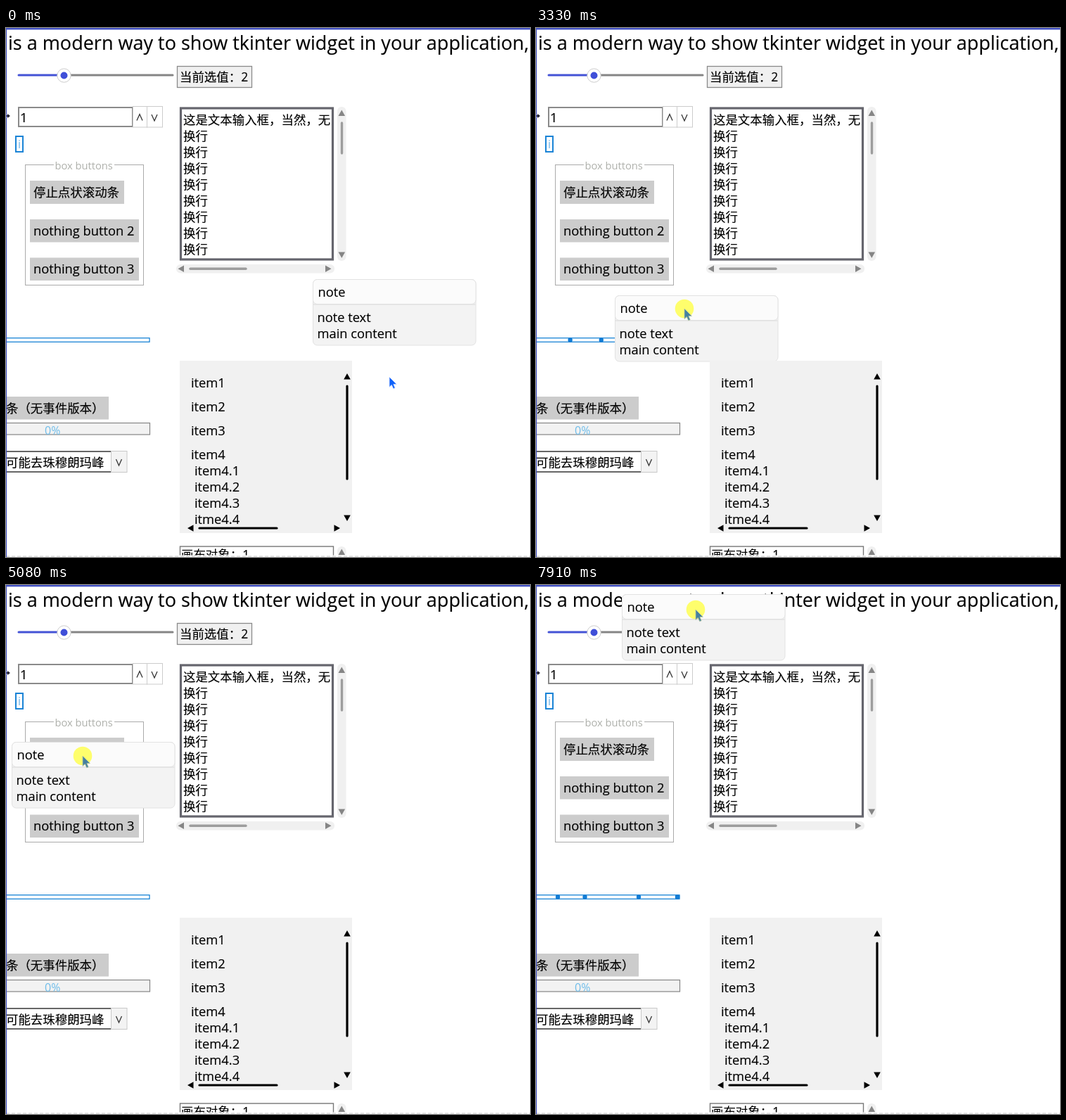
An HTML page for the animation above (7990 ms loop, 745x752 px).

```html
<!DOCTYPE html>
<html lang="zh-CN">
<head>
<meta charset="utf-8">
<style>
  html, body { margin: 0; width: 100%; height: 100%; overflow: hidden; background: #fff; }
  svg { display: block; width: 745px; height: 752px; }
  text { font: 18.3px "Open Sans", "Noto Sans CJK SC", "Noto Sans CJK", sans-serif; fill: #000; stroke: #000; stroke-width: .15px; white-space: pre; }
  .cjk { font-size: 17.45px; }
  .tint { stroke: none; }
  .round { stroke-linecap: round; }
</style>
</head>
<body>
<svg viewBox="0 0 745 752">
  <g id="base"></g>
  <g id="dots" fill="#0f7bd4"></g>
  <g id="panel"></g>
  <g id="top"></g>
  <g id="cursor">
    <circle id="halo" r="13.3" fill="#ffff3c" opacity=".75"/>
    <path id="arrow" d="M0 0V14.5L3.3 11.4 5.7 16.8 8.2 15.7 5.9 10.4H10.4Z" stroke-width=".8"/>
  </g>
</svg>
<script>
const NS = 'http://www.w3.org/2000/svg';
const $ = id => document.getElementById(id);
let layer = $('base');

function add(tag, attrs, content) {
  const el = document.createElementNS(NS, tag);
  for (const k in attrs) el.setAttribute(k, attrs[k]);
  if (content) el.textContent = content;
  return layer.appendChild(el);
}
const rect = (x, y, width, height, fill, more) => add('rect', { x, y, width, height, fill, ...more });
const frame = (x, y, w, h, stroke, sw = 1, fill = 'none') =>
  rect(x, y, w, h, fill, { stroke, 'stroke-width': sw });
const text = (x, y, s, more) => add('text', { x, y, ...more }, s);
const cjk = (x, y, s) => text(x, y, s, { class: 'cjk' });
const tinted = (x, y, s, size, fill) =>
  text(x, y, s, { class: 'tint', style: `font-size:${size}px;fill:${fill}` });
const line = (x1, y1, x2, y2, stroke, sw, more) =>
  add('line', { x1, y1, x2, y2, stroke, 'stroke-width': sw, ...more });
const bar = (x1, y1, x2, y2, color, sw) => line(x1, y1, x2, y2, color, sw, { class: 'round' });
const tri = (x, y, turn, fill) =>
  add('path', { d: 'M0-4.5L4.8 4H-4.8Z', fill, transform: `translate(${x} ${y}) rotate(${turn})` });
const caret = (x, y, dir) =>
  add('path', { d: `M${x - 4} ${y + 4.5 * dir}L${x} ${y - 4.5 * dir}L${x + 4} ${y + 4.5 * dir}`,
    fill: 'none', stroke: '#333', 'stroke-width': 1.3 });

function drawBase() {
  text(3, 30.7, 'is a modern way to show tkinter widget in your application,', { style: 'font-size:27px' });

  // slider and its value
  bar(18, 67, 76, 67, '#4453d6', 3);
  bar(88, 67, 237, 67, '#858585', 3);
  add('circle', { cx: 82.5, cy: 67.5, r: 9.7, fill: '#fff', stroke: '#ccc' });
  add('circle', { cx: 82.5, cy: 67.5, r: 5, fill: '#3f4fd8' });
  frame(243.5, 54.5, 106, 30, '#8a8a8a', 1.3, '#f0f0f0');
  cjk(247, 76, '当前选值：2');

  // spin box
  add('path', { d: 'M0 124H2V122L6 125 2 128V126H0Z', fill: '#223' });
  frame(18, 113, 162, 27, '#8a8a8a', 2);
  text(20, 134, '1');
  frame(180.5, 111.5, 20, 29.5, '#ccc');
  frame(200.5, 111.5, 22, 29.5, '#ccc');
  caret(190, 127, 1);
  caret(211, 127.5, -1);

  frame(14, 154, 10, 22, '#1a84d6', 2);
  tinted(17, 171, 'i', 16, '#6db4ea');

  // button group
  frame(27.5, 194.5, 168, 171, '#aaa');
  rect(68, 190, 86, 10, '#fff');
  tinted(69.5, 201, 'box buttons', 14.7, '#aeb0ab');
  rect(34, 217, 134, 33, '#ccc');
  cjk(39, 240, '停止点状滚动条');
  [2, 3].forEach((n, i) => {
    rect(34, 272 + 54.5 * i, 155, 32.5, '#ccc');
    text(39, 294.5 + 54.5 * i, 'nothing button ' + n);
  });

  // text box scroll bars
  rect(471, 112, 12.5, 219, '#f0f0f0', { rx: 6 });
  bar(477.5, 135, 477.5, 178, '#9d9d9d', 3.4);
  tri(477.3, 121, 0, '#858585');
  tri(477.3, 322.5, 180, '#858585');
  rect(242, 336, 225, 12.5, '#f0f0f0', { rx: 6 });
  bar(262, 342.3, 341, 342.3, '#9d9d9d', 3.4);
  tri(249, 342.3, -90, '#858585');
  tri(458, 342.3, 90, '#858585');

  // progress widgets and combo box
  frame(-2, 440.7, 206, 5.6, '#1a84d6', 1.3);
  rect(0, 524, 146, 32.5, '#ccc');
  cjk(0, 546.5, '条（无事件版本）');
  frame(-2, 561.5, 206.5, 16.5, '#858585', 1.2, '#f2f2f2');
  tinted(55, 577.5, '0%', 16, '#6fbdea');
  line(0, 602, 150, 602, '#333', 1.4);
  line(0, 631, 150, 631, '#333', 1.4);
  cjk(0, 624, '可能去珠穆朗玛峰');
  frame(149.5, 601.5, 22.5, 30, '#c8c8c8', 1, '#f3f3f3');
  caret(160.5, 617.5, -1);

  rect(471, 737, 12.5, 15, '#f0f0f0', { rx: 6 });
  tri(477.3, 745, 0, '#858585');
}

function drawPanel() {
  rect(.5, .5, 231.5, 93.5, '#f3f3f3', { rx: 6, stroke: '#e2e2e2' });
  rect(.5, .5, 231.5, 35, '#fbfbfb', { rx: 6, stroke: '#e2e2e2' });
  line(1, 36, 231.5, 36, '#e2e2e2', 1.6);
  text(7.5, 24.5, 'note');
  text(6.5, 60.5, 'note text');
  text(6.5, 83.5, 'main content');
}

function drawTop() {
  frame(248.5, 114, 216, 215, '#65656d', 3.2, '#fff');
  cjk(252, 136.5, '这是文本输入框，当然，无');
  for (let i = 0; i < 8; i++) cjk(252, 159.5 + 23 * i, '换行');

  rect(247, 473, 245, 245, '#f1f1f1');
  for (let i = 1; i <= 4; i++) {
    text(263, 476.5 + 34 * i, 'item' + i);
    text(268, 612.5 + 23 * i, (i < 4 ? 'item4.' : 'itme4.') + i);
  }
  bar(485, 509, 485, 641, '#000', 3.2);
  tri(485, 495.5, 0, '#000');
  tri(485, 696.5, 180, '#000');
  bar(275, 711, 385, 711, '#000', 3.2);
  tri(262.5, 711, -90, '#000');
  tri(470.5, 711, 90, '#000');

  frame(247.5, 737, 218, 30, '#777', 1.4, '#fff');
  cjk(249, 755, '画布对象：1');
  rect(0, 749.5, 745, 3, '#fff');
  line(0, 751, 745, 751, '#ccc', 1, { 'stroke-dasharray': '5 3' });
  rect(0, 0, 745, 2.4, '#4453c4');
  rect(0, 0, 1.1, 752, '#4453c4');
}

// rows of [time, value, ...], linear in between
function sample(keys, t) {
  let i = 1;
  while (i < keys.length - 1 && keys[i][0] < t) i++;
  const a = keys[i - 1], b = keys[i];
  const p = Math.min(1, Math.max(0, (t - a[0]) / (b[0] - a[0])));
  return a.slice(1).map((v, j) => v + (b[j + 1] - v) * p);
}

const LOOP = 7990, STEP = 67.13, PRESS = 1200;
const GRAB = [101.5, 20.5];
const panelPath = [
  [0, 436, 357], [1450, 436, 357], [1595, 402, 361], [1740, 368, 351], [2150, 295, 340],
  [2610, 228, 348], [3335, 112, 380], [3410, 109, 378], [4075, 60, 335], [4220, 51, 326],
  [5010, 9, 225], [5080, 8, 223], [5810, 7, 213], [6630, 24, 36], [6900, 22, 6],
  [7020, 24, 0], [7430, 95, 4], [7905, 122, 13], [7990, 126, 15]
];
const approach = [[190, 545, 496], [560, 549, 438], [940, 537.5, 377.5]];

// each dot runs to the end of the bar and waits there until its group is done
const END = 201, ENTRY = -4;
const groups = [
  { until: 4690, dots: [
    [[900, ENTRY], [1595, 64], [2790, END]],
    [[1270, ENTRY], [1595, 26], [3150, END]],
    [[1850, ENTRY], [3700, END]],
    [[2500, ENTRY], [3335, 92], [4070, END]],
    [[2890, ENTRY], [3335, 48], [4075, 135.5], [4620, END]]] },
  { until: LOOP, dots: [
    [[5650, ENTRY], [6900, 146], [7350, END]],
    [[6290, ENTRY], [6900, 69.5], [7900, END]],
    [[6600, ENTRY], [6900, 31], [7905, 146]],
    [[6870, ENTRY], [6900, -1], [7905, 69.5]],
    [[7620, ENTRY], [7905, 31]]] }
];

drawBase();
layer = $('panel');
drawPanel();
layer = $('top');
drawTop();
layer = $('dots');
for (const g of groups)
  g.marks = g.dots.map(() => add('circle', { cy: 443.5, r: 3.2 }));

const place = (id, [x, y]) => $(id).setAttribute('transform', `translate(${x} ${y})`);

function render(ms) {
  const k = Math.floor((ms - 170) / STEP);
  const t = k < 0 ? 0 : 185 + k * STEP;
  const held = t >= PRESS;
  place('panel', sample(panelPath, t).map(Math.round));
  place('cursor', held
    ? sample(panelPath, t + STEP).map((v, i) => Math.round(v + GRAB[i]))
    : sample(approach, t));
  $('halo').style.display = held ? '' : 'none';
  $('arrow').setAttribute('fill', held ? '#4580a0' : '#0f62fa');
  $('arrow').setAttribute('stroke', held ? '#b9c8a0' : '#dce6ff');
  for (const g of groups)
    g.dots.forEach((keys, i) => {
      const mark = g.marks[i];
      mark.style.display = t >= keys[0][0] && t < g.until ? '' : 'none';
      mark.setAttribute('cx', sample(keys, t)[0]);
    });
}

const start = performance.now();
function tick() {
  render((performance.now() - start) % LOOP);
  requestAnimationFrame(tick);
}
tick();
</script>
</body>
</html>
```
